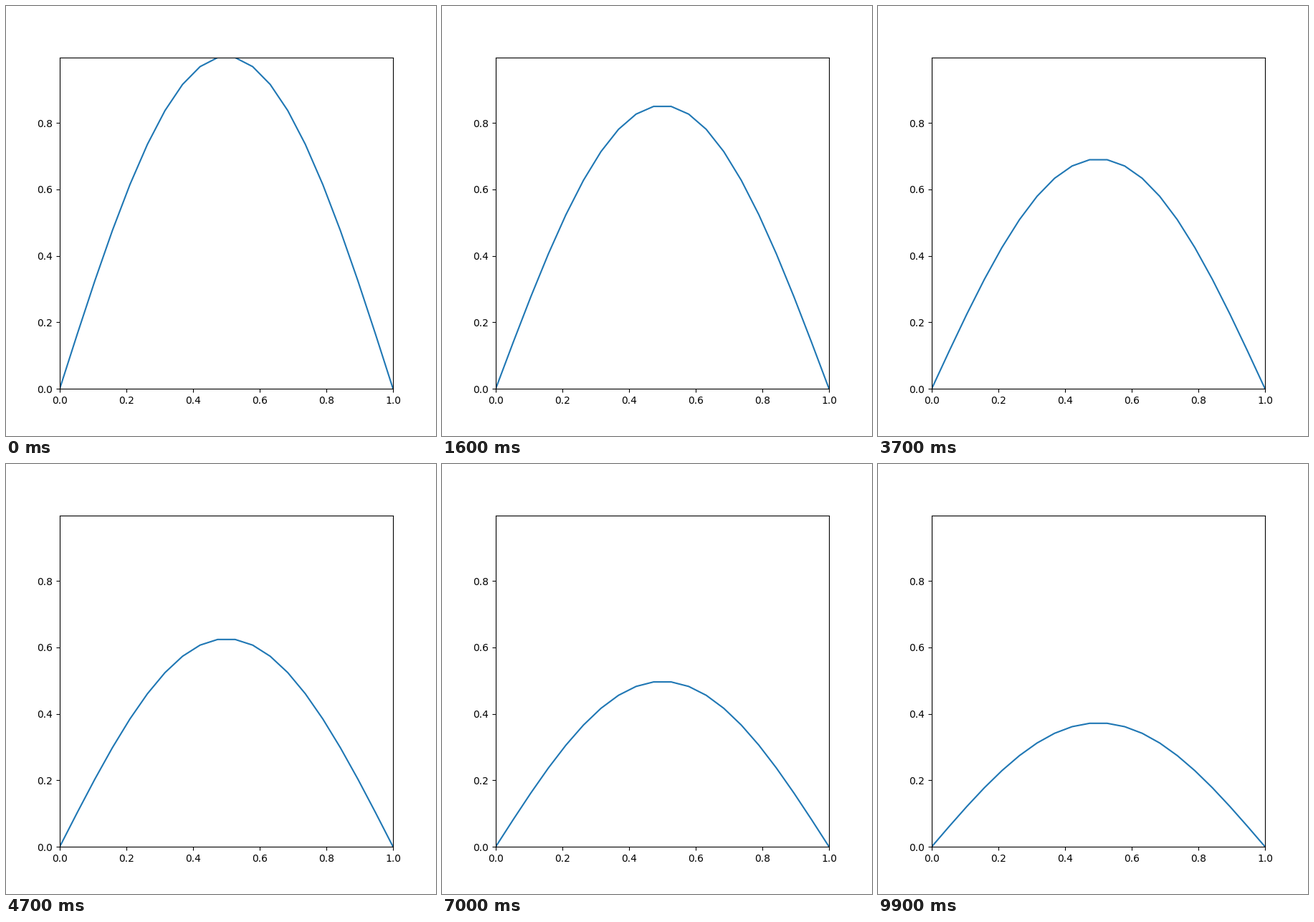
Animation of 600 by 600 pixels, one loop 10 s. Source, as a matplotlib script:

```python
import numpy as np
import matplotlib.pyplot as plt
from matplotlib.animation import FuncAnimation

# Heat equation on a unit rod with cold ends: the first sine mode decays.
FRAMES = 100
x = np.linspace(0, 1, 20)
times = np.linspace(0, 0.1, FRAMES)
start = np.sin(np.pi * x)

fig, ax = plt.subplots(figsize=(6, 6), dpi=100)
ax.set_xlim(0, 1)
ax.set_ylim(0, start.max())
line, = ax.plot(x, start)


def update(i):
    line.set_ydata(start * np.exp(-np.pi**2 * times[i]))
    return line,


anim = FuncAnimation(fig, update, frames=FRAMES, interval=100,
                     repeat=True, repeat_delay=0)
plt.show()
```
